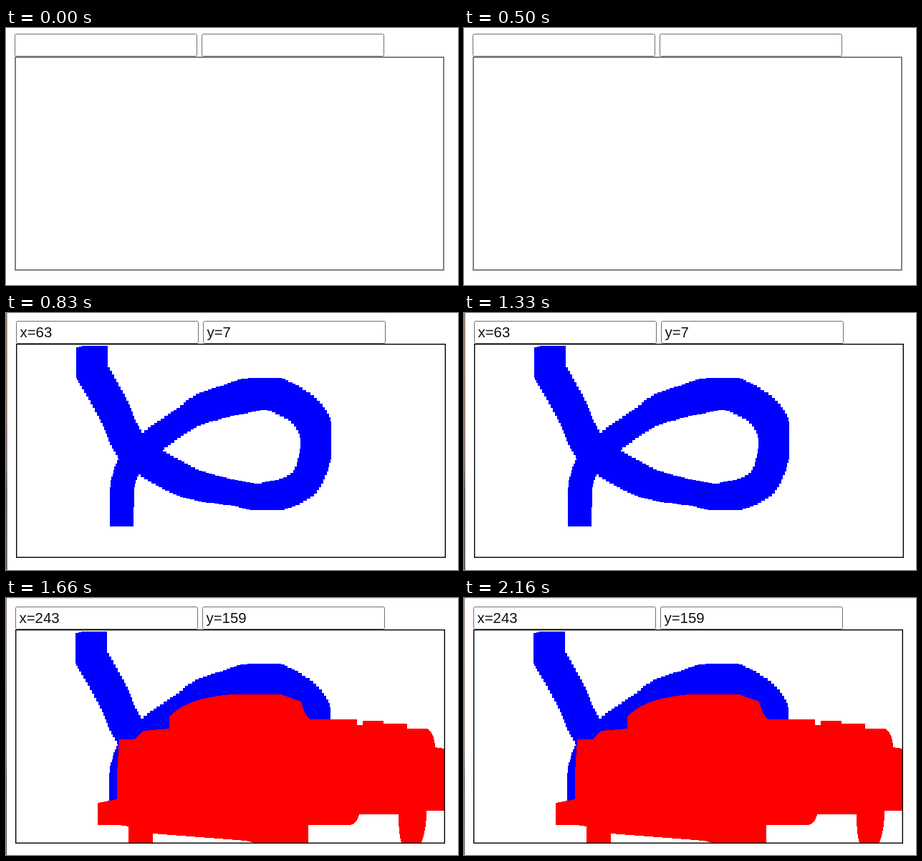
Write an HTML page that moves like this. It is 631 px wide and 360 px high and loops after 2.49 s.

```html
<!DOCTYPE html>
<html lang="en">
<head>
<meta charset="utf-8">
<title>Drawing on a canvas</title>
<style>
  html, body { margin: 0; width: 100%; height: 100%; overflow: hidden; background: #fff; }
  svg { display: block; width: 631px; height: 360px; }
  text { font: 20.4px "Liberation Sans", Arial, sans-serif; fill: #111; white-space: pre; }
  .ink { shape-rendering: crispEdges; }
</style>
</head>
<body>
<svg id="stage" viewBox="0 0 631 360"></svg>
<script>
const STEP = 830;

// Where the square brush was dragged: x, y, brush size.
const drag = [
  [124, 64, 36], [116, 73, 36], [148, 131, 36], [178, 190, 36], [240, 231, 36],
  [280, 245, 35], [330, 254, 32], [370, 257, 37], [417, 236, 33], [433, 179, 42],
  [420, 141, 36], [380, 116, 39], [354, 113, 43], [318, 121, 39], [278, 133, 35],
  [252, 147, 28], [212, 174, 28], [180, 201, 29], [167, 225, 28], [162, 255, 33], [161, 282, 33]
];

// Catmull-Rom value between b and c.
const spline = (a, b, c, d, t) =>
  b + t * (c - a + t * (2 * a - 5 * b + 4 * c - d + t * (3 * (b - c) + d - a))) / 2;

// One square stamp every few pixels along the drag.
function stamps(keys, gap) {
  const at = i => keys[Math.max(0, Math.min(keys.length - 1, i))];
  let d = "";
  for (let i = 0; i < keys.length - 1; i++) {
    const [a, b, c, e] = [at(i - 1), at(i), at(i + 1), at(i + 2)];
    const n = Math.ceil(Math.hypot(c[0] - b[0], c[1] - b[1]) / gap);
    for (let k = 0; k <= n; k++) {
      const [x, y, s] = b.map((_, j) => spline(a[j], b[j], c[j], e[j], k / n));
      d += `M${x - s / 2} ${y - s / 2}h${s}v${s}h${-s}z`;
    }
  }
  return d;
}

const ink = (color, d) => `<path class="ink" fill="${color}" d="${d}"/>`;
const blueInk = ink("#00f", stamps(drag, 6));
const redInk = ink("#f00", `M128 287L155 282V245L158 198H179L192 186L228 183V167
  Q250 140 316 135H384L412 145Q417 165 425 170H490V178H498V172H527V176H560V183H588
  Q598 188 599 209L612 211V298H587Q587 325 580 343H552Q548 330 548 303H493
  Q490 318 478 318H422V343H347L335 340L205 330V343H171V320L158 318H128Z`);

function box(x, y, w, h, line, color, r = 0) {
  return `<rect x="${x + line / 2}" y="${y + line / 2}" width="${w - line}" height="${h - line}"
    rx="${r}" fill="none" stroke="${color}" stroke-width="${line}"/>`;
}

function page({ x, y, line = 1.4, color = "#000", values = ["", ""], art = "", edge = "" }) {
  const fields = values.map((value, i) => {
    const left = x + i * 261;
    return box(left, y - 32, 255, 32, 1, "#707070", 2) +
      `<text x="${left + 5.5}" y="${y - 9}">${value}</text>`;
  }).join("");
  return `<g visibility="hidden">${edge}${art}${fields}${box(x, y, 600, 300, line, color)}</g>`;
}

const side = w => `<rect width="${w}" height="360" fill="url(#side)"/>`;
const stage = document.getElementById("stage");
stage.innerHTML = `<defs><linearGradient id="side" x2="0" y2="1">
  <stop stop-color="#8f7767"/><stop offset=".6" stop-color="#7a6a60"/>
  <stop offset=".7" stop-color="#4c4744"/><stop offset="1" stop-color="#5a524d"/>
  </linearGradient></defs>` +
  page({ x: 12, y: 40, line: 2, color: "#808080" }) +
  page({ x: 14, y: 43, values: ["x=63", "y=7"], art: blueInk, edge: side(1.7) }) +
  page({ x: 13, y: 44, values: ["x=243", "y=159"],
    art: `<g transform="translate(-1 1)">${blueInk}</g>${redInk}`,
    edge: `<rect width="631" height="1" fill="#ddd"/>` + side(1) });

const pages = [...stage.querySelectorAll(":scope > g")];
const start = performance.now();
function draw(now) {
  const current = Math.floor(Math.max(0, now - start) / STEP) % pages.length;
  pages.forEach((p, i) => p.setAttribute("visibility", i === current ? "visible" : "hidden"));
  requestAnimationFrame(draw);
}
draw(start);
</script>
</body>
</html>
```
